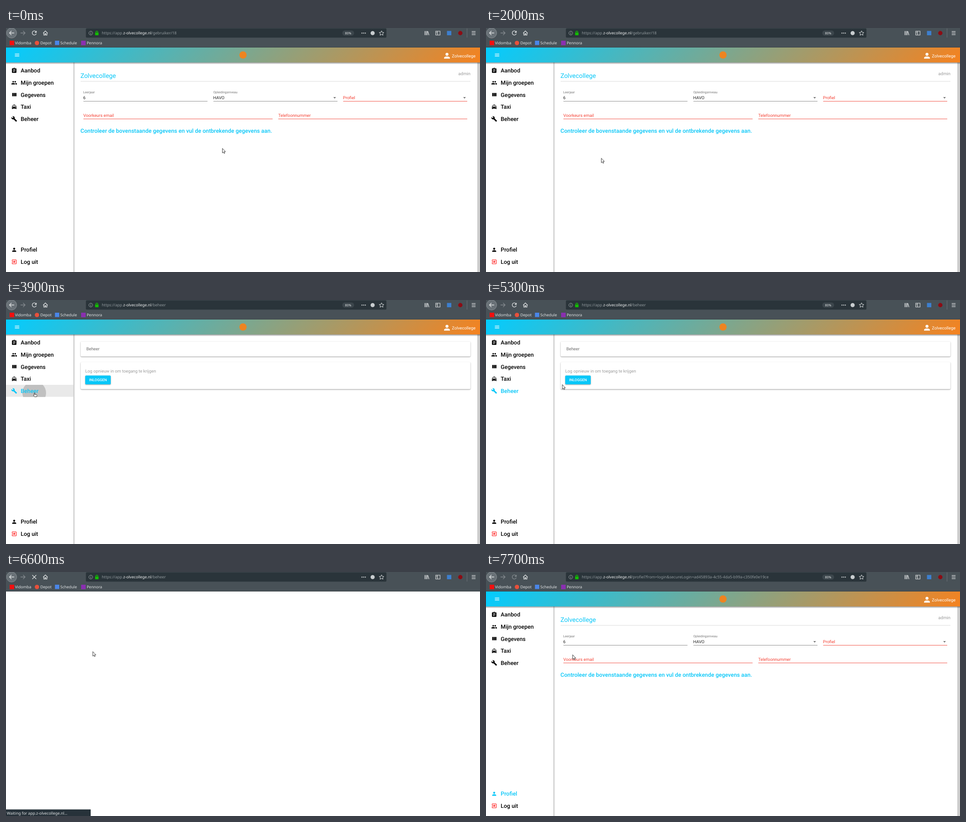
Recreate the animation shown at these times as an HTML page. Size 1041 by 538 pixels, loop 8000 ms.

```html
<!DOCTYPE html>
<html lang="nl">
<head>
<meta charset="utf-8">
<title>Beheer login</title>
<style>
  html, body { margin: 0; width: 100%; height: 100%; overflow: hidden; background: #fff; }
  svg { display: block; width: 1041px; height: 538px; }
  text { font-family: Roboto, sans-serif; font-size: 9.35px; text-rendering: geometricPrecision; white-space: pre; }
  .ui text { font-family: "Noto Sans", sans-serif; font-size: 8.57px; fill: #e4e7e8; }
  .ui .url { fill: #929a9e; }
  .url tspan { fill: #f3f4f4; }
  .line { fill: none; stroke: #dfe2e3; stroke-width: 1.3; }
  .nav text { font-size: 12.4px; font-weight: 500; }
  .nav use { transform: translate(11.4px, -6.6px) scale(.55); }
  .cyan { fill: #08c7f8; }
  .red { fill: #f44336; }
  .small { font-size: 7px; fill: #757575; }
  .medium { font-weight: 500; }
  .card { fill: #fff; filter: drop-shadow(0 1px 1.2px rgba(0, 0, 0, .42)); }

  /* Hard cuts */
  .form, .panel, .app, .short, .admin, .long, .reload, .sliver, .stop, .dim, .pill,
  .status, .waiting, .read, .hover, .ripple, .tint, .press, .tools, .me, .arrow, .hand, .cursor {
    animation: 8s step-end infinite;
  }
  .form { animation-name: form; }
  .panel { animation-name: panel; }
  .app { animation-name: app; }
  .short { animation-name: short; }
  .admin { animation-name: admin; }
  .long { animation-name: long; }
  .reload { animation-name: reload; }
  .sliver { animation-name: sliver; }
  .stop { animation-name: stop; }
  .dim { animation-name: dim; }
  .pill { animation-name: pill; }
  .status { animation-name: status; }
  .waiting { animation-name: waiting; }
  .read { animation-name: read; }
  .hover { animation-name: hover; }
  .ripple { animation-name: ripple; }
  .tint { animation-name: tint; }
  .press { animation-name: press; }
  .tools { animation-name: tools; }
  .me { animation-name: me; }
  .arrow { animation-name: arrow; }
  .hand { animation-name: hand; }
  .cursor { animation-name: cursor; }

  @keyframes form { 0%, 92.5% { opacity: 1 } 48.75% { opacity: 0 } }
  @keyframes panel { 0%, 82.5% { opacity: 0 } 48.75% { opacity: 1 } }
  @keyframes app { 0%, 92.5% { opacity: 1 } 82.5% { opacity: 0 } }
  @keyframes short { 0% { opacity: 1 } 48.75% { opacity: 0 } }
  @keyframes admin { 0%, 87.5% { opacity: 0 } 48.75% { opacity: 1 } }
  @keyframes long { 0% { opacity: 0 } 87.5% { opacity: 1 } }
  @keyframes reload { 0% { opacity: 1 } 78.75% { opacity: 0 } }
  @keyframes sliver { 0%, 82.5% { opacity: 0 } 78.75% { opacity: 1 } }
  @keyframes stop { 0%, 96.25% { opacity: 0 } 82.5% { opacity: 1 } 92.5% { opacity: .5 } }
  @keyframes dim { 0% { opacity: 0 } 96.25% { opacity: .4 } }
  @keyframes pill { 0%, 87.5% { opacity: 1 } 82.5% { opacity: 0 } }
  @keyframes status { 0%, 92.5% { opacity: 0 } 78.75% { opacity: 1 } }
  @keyframes waiting { 0% { opacity: 1 } 87.5% { opacity: 0 } }
  @keyframes read { 0% { opacity: 0 } 87.5% { opacity: 1 } }
  @keyframes hover { 0%, 55% { opacity: 0 } 42.5% { opacity: 1 } }
  @keyframes ripple {
    0%, 55% { opacity: 0; r: 26px }
    48.75% { opacity: .17; r: 26px }
    51.25% { opacity: .1; r: 90px }
  }
  @keyframes tint { 0% { fill: #08c7f8 } 68.75% { fill: #05a6d0 } 72.5% { fill: #0089b3 } }
  @keyframes press { 0% { opacity: 0 } 78.75% { opacity: .18 } }
  @keyframes tools { 0%, 82.5% { fill: #000 } 48.75% { fill: #08c7f8 } }
  @keyframes me { 0% { fill: #000 } 92.5% { fill: #08c7f8 } }
  @keyframes arrow { 0%, 63.75%, 82.5% { opacity: 1 } 42.5%, 68.75% { opacity: 0 } }
  @keyframes hand { 0%, 63.75%, 82.5% { opacity: 0 } 42.5%, 68.75% { opacity: 1 } }

  /* Two sampled sweeps, then jumps */
  @keyframes cursor {
    0% { transform: translate(475px, 265px) }
    15% { transform: translate(475px, 265px); animation-timing-function: steps(9, jump-start) }
    26.25% { transform: translate(253px, 286.6px); animation-timing-function: steps(5, jump-start) }
    32.5% { transform: translate(127px, 260px) }
    42.5% { transform: translate(63.5px, 204px) }
    57.5% { transform: translate(92.5px, 201.5px) }
    60% { transform: translate(127.5px, 195.5px) }
    63.75% { transform: translate(157px, 189px) }
    66.25% { transform: translate(167.3px, 186px) }
    68.75% { transform: translate(192px, 175px) }
    82.5% { transform: translate(190.3px, 175px) }
    96.25%, 100% { transform: translate(190px, 182px) }
  }
</style>
</head>
<body>
<svg viewBox="0 0 1041 538">
  <defs>
    <linearGradient id="sky" gradientUnits="userSpaceOnUse" x1="252" y1="-209" x2="789" y2="328">
      <stop stop-color="#03ccff"/><stop offset="1" stop-color="#f5821f"/>
    </linearGradient>
    <linearGradient id="down" x2="0" y2="1">
      <stop stop-opacity=".4"/><stop offset="1" stop-opacity="0"/>
    </linearGradient>
    <linearGradient id="right">
      <stop stop-opacity=".25"/><stop offset="1" stop-opacity="0"/>
    </linearGradient>
    <clipPath id="row"><path d="M0 187h148v26.5H0z"/></clipPath>
    <clipPath id="btn"><rect x="174" y="166.5" width="56" height="19.6" rx="2"/></clipPath>

    <path id="clip" fill-rule="evenodd" d="M5 3h4a3 3 0 0 1 6 0h4q2 0 2 2v14q0 2-2 2H5q-2 0-2-2V5q0-2 2-2zm6 1a1 1 0 0 0 2 0 1 1 0 0 0-2 0zM7 7v2h10V7zm0 4v2h10v-2zm0 4v2h7v-2z"/>
    <path id="group" d="M5 8a3 3 0 0 1 6 0 3 3 0 0 1-6 0zM13 8a3 3 0 0 1 6 0 3 3 0 0 1-6 0zM1 19v-2.500Q1 13.500 8 13q7 .5 7 3.500V19zM17 19v-2.500q0-2-2-3.450 8 0 8 3.450V19z"/>
    <path id="columns" d="M4 5h5v13H4zM10 5h5v13h-5zM16 5h5v13h-5z"/>
    <path id="taxi" fill-rule="evenodd" d="M9 3h6v2h2.500q1 0 1.400 1L21 12v8q0 1-1 1h-1q-1 0-1-1v-1H6v1q0 1-1 1H4q-1 0-1-1v-8l2.100-6Q5.500 5 6.500 5H9zM5 11h14l-1.500-4.500h-11zm0 3.500a1.500 1.500 0 0 0 3 0 1.500 1.500 0 0 0-3 0zm11 0a1.500 1.500 0 0 0 3 0 1.500 1.500 0 0 0-3 0z"/>
    <path id="wrench" d="M22.700 19l-9.100-9.100c.9-2.300.4-5-1.500-6.900-2-2-5-2.400-7.400-1.300L9 6 6 9 1.600 4.700C.4 7.100.9 10.100 2.900 12.100c1.900 1.900 4.600 2.400 6.900 1.500l9.100 9.100q.7.600 1.400 0l2.300-2.300q.7-.7.100-1.400z"/>
    <path id="person" d="M8 8a4 4 0 0 1 8 0 4 4 0 0 1-8 0zM4 20v-2q0-3.500 8-4 8 .5 8 4v2z"/>
    <path id="exit" d="M10 15.600L11.500 17l5-5-5-5L10 8.400l2.700 2.600H3v2h9.700zM3 9V5q0-2 2-2h14q2 0 2 2v14q0 2-2 2H5q-2 0-2-2v-4h2v4h14V5H5v4z"/>
    <g id="turn">
      <path class="line" d="M66 8.300A4.600 4.600 0 1 0 66.500 12.500"/>
      <path fill="#dfe2e3" d="M67.300 5.800v4.700h-4.700z"/>
    </g>
  </defs>

  <rect width="1041" height="538" fill="#fff"/>

  <g class="app">
    <rect x="1035" y="76" width="6" height="462" fill="#cdcdcd"/>

    <g class="form">
      <text class="cyan" x="163.500" y="109.700" style="font-size:13.9px">Zolvecollege</text>
      <text x="1020" y="104" text-anchor="end" fill="#9a9a9a" style="font-size:9.6px">admin</text>
      <path d="M164 117.500h856" stroke="#dcdcdc"/>
      <text class="small" x="169.600" y="143.500">Leerjaar</text>
      <text class="small" x="455.200" y="143.500">Opleidingsniveau</text>
      <text x="169.600" y="157" fill="#222">6</text>
      <text x="455" y="157" fill="#222">HAVO</text>
      <text class="red" x="740" y="157">Profiel</text>
      <text class="red" x="169.700" y="195.500">Voorkeurs email</text>
      <text class="red" x="598" y="195.500">Telefoonnummer</text>
      <path d="M170 161.500h272.500M455.500 161.500H728" stroke="#8f8f8f"/>
      <path d="M740.500 161.500H1013M170 200.500h415.500M598 200.500h415" stroke="#f2564b"/>
      <path d="M718.800 152.500h6l-3 3zM1004 152.500h6l-3 3z" fill="#666"/>
      <text class="cyan medium" x="163.600" y="231.200" style="font-size:12.4px">Controleer de bovenstaande gegevens en vul de ontbrekende gegevens aan.</text>
    </g>

    <g class="panel">
      <rect class="card" x="164" y="91.500" width="856" height="33" rx="2"/>
      <rect class="card" x="164" y="137" width="856" height="59.500" rx="2"/>
      <text x="176.400" y="111.400" fill="#6f6f6f">Beheer</text>
      <text x="174" y="160.200" fill="#9c9c9c">Log opnieuw in om toegang te krijgen</text>
      <g style="filter:drop-shadow(0 1px 1px rgba(0,0,0,.4))">
        <rect class="tint" x="174" y="166.500" width="56" height="19.600" rx="2"/>
      </g>
      <g clip-path="url(#btn)"><circle class="press" cx="192" cy="176" r="27" fill="#fff"/></g>
      <text class="medium" x="202" y="179.300" text-anchor="middle" fill="#fff" style="font-size:8.1px">INLOGGEN</text>
    </g>

    <path d="M0 76h148v462H0z" fill="#fff"/>
    <path d="M148 76h4v462h-4z" fill="url(#right)"/>
    <g clip-path="url(#row)">
      <path class="hover" d="M0 187h148v26.500H0z" fill="#e9e9e9"/>
      <circle class="ripple" cx="62" cy="205" r="26"/>
    </g>
    <g class="nav">
      <g transform="translate(0 94)"><use href="#clip"/><text x="32.300" y="4.400">Aanbod</text></g>
      <g transform="translate(0 120.600)"><use href="#group"/><text x="32.300" y="4.400">Mijn groepen</text></g>
      <g transform="translate(0 147.200)"><use href="#columns"/><text x="32.300" y="4.400">Gegevens</text></g>
      <g transform="translate(0 173.900)"><use href="#taxi"/><text x="32.300" y="4.400">Taxi</text></g>
      <g transform="translate(0 200.500)" class="tools"><use href="#wrench"/><text x="32.300" y="4.400">Beheer</text></g>
      <g transform="translate(0 489)" class="me"><use href="#person"/><text x="32.300" y="4.400">Profiel</text></g>
      <g transform="translate(0 515.600)"><use href="#exit" fill="#f00"/><text x="32.300" y="4.400">Log uit</text></g>
    </g>

    <path d="M0 76h1041v4H0z" fill="url(#down)"/>
    <path d="M0 43h1041v33H0z" fill="url(#sky)"/>
    <path d="M19.500 56.700h9.600m-9.600 2.900h9.600m-9.600 2.900h9.600" stroke="#fff" stroke-width="1.100"/>
    <circle cx="520.500" cy="59.500" r="8" fill="#ee8420"/>
    <use href="#person" transform="translate(958.900 51.500) scale(.8)" fill="#fff"/>
    <text x="979.200" y="64.900" fill="#fff" style="font-size:9.25px">Zolvecollege</text>
  </g>

  <g class="ui">
    <path d="M0 0h1041v43H0z" fill="#485157"/>
    <path d="M0 42.500h1041" stroke="#3b4348"/>
    <circle cx="12.300" cy="11" r="11.200" fill="#697177" stroke="#858c91"/>
    <path class="line" d="M18 11H7.500m4.500-4.500L7.500 11l4.500 4.500"/>
    <path class="line" d="M32 11h10m-4.500-4.500L42 11l-4.500 4.500" opacity=".4"/>
    <use class="reload" href="#turn"/>
    <use class="dim" href="#turn"/>
    <path class="line sliver" d="M58 7l3 3.500"/>
    <path class="line stop" d="M57.700 6.700l8.800 8.800m0-8.800l-8.800 8.800"/>
    <path class="line" d="M81.500 11.500l5-5 5 5M83 10.500v5.200h2.600v-3.200h1.800v3.200H90v-5.200"/>

    <rect x="175.500" y=".8" width="660" height="20.500" rx="2" fill="#2a343a"/>
    <circle class="line" cx="186.200" cy="11.200" r="4.200" style="stroke:#a3abae;stroke-width:.9"/>
    <path d="M186.200 8.600v1.100m0 1v3" stroke="#a3abae"/>
    <path d="M197.300 10.500V9.200a2.200 2.200 0 0 1 4.400 0v1.300" fill="none" stroke="#12bc00" stroke-width="1.300"/>
    <rect x="195.700" y="10" width="7.600" height="6" rx="1" fill="#12bc00"/>
    <text class="url short" x="210.300" y="14.300">https://app.<tspan>z-olvecollege.nl</tspan>/gebruiker/18</text>
    <text class="url admin" x="210.300" y="14.300">https://app.<tspan>z-olvecollege.nl</tspan>/beheer</text>
    <text class="url long" x="210.300" y="14.300">https://app.<tspan>z-olvecollege.nl</tspan>/profiel?from=login&amp;secureLogin=ad45893a-4c55-4da5-b99a-c350fe0e19ce</text>
    <g class="pill">
      <rect x="738.500" y="5.500" width="26" height="11.500" rx="5.700" fill="#3c464c"/>
      <text x="751.300" y="13.800" text-anchor="middle" style="font-size:7px">80%</text>
    </g>
    <path d="M781.800 11.200h8.500" stroke="#c8cdcf" stroke-width="2.400" stroke-linecap="round" stroke-dasharray="0 3.700"/>
    <circle cx="805.200" cy="11.200" r="4.500" fill="#c8cdcf"/>
    <path class="line" stroke-linejoin="round" style="stroke-width:1" d="M824.800 6.200l1.500 3.400 3.700.4-2.800 2.400.9 3.600-3.300-1.900-3.300 1.900.9-3.600-2.800-2.400 3.700-.4z"/>
    <path class="line" d="M920 6.800v9m2.600-9v9m2.500-9v9m1.200-8.500l2.600 8.500"/>
    <path class="line" style="stroke-width:1.100" d="M943.800 7h9.500v8.500h-9.500zm4 0v8.500m-2.700-6.500h1.500m-1.500 2h1.500"/>
    <rect x="968.500" y="6.500" width="9.500" height="9.500" fill="#3d7fce"/>
    <circle cx="997.800" cy="11.200" r="4.700" fill="#8c0c14"/>
    <path d="M1012.500 1v20" stroke="#697177"/>
    <path class="line" d="M1022.800 7.700h8.400m-8.400 3.500h8.400m-8.400 3.500h8.400"/>

    <rect x="8" y="28" width="10" height="10" fill="#f00f0f"/>
    <circle cx="68" cy="33" r="4.800" fill="#e8503a"/>
    <rect x="107.500" y="28" width="9.500" height="9.500" fill="#4a86e8"/>
    <rect x="165" y="28" width="10" height="10" fill="#8a2fb0"/>
    <text x="19.700" y="36">Vidomba</text>
    <text x="75.500" y="36">Depot</text>
    <text x="119.200" y="36">Schedule</text>
    <text x="177.200" y="36">Pennora</text>

    <g class="status">
      <path d="M0 523.500h186V538H0z" fill="#27323a"/>
      <text class="waiting" x="1.800" y="534.700">Waiting for app.z-olvecollege.nl...</text>
      <text class="read" x="1.800" y="534.700">Read app.z-olvecollege.nl</text>
    </g>
  </g>

  <g class="cursor" fill="#fff" stroke="#222" stroke-width=".9" stroke-linejoin="round">
    <path class="arrow" d="M.3 .5v10l2.200-2.100 1.500 3.300 1.700-.8-1.500-3.200h2.900z"/>
    <path class="hand" d="M-1.600 1Q-.8-.4 0 1v3l3.600.7q1 .3.800 1.800L3.700 9.500h-4.500L-3 6.600q-.3-1.500 1.400-.6z"/>
  </g>
</svg>
</body>
</html>
```
